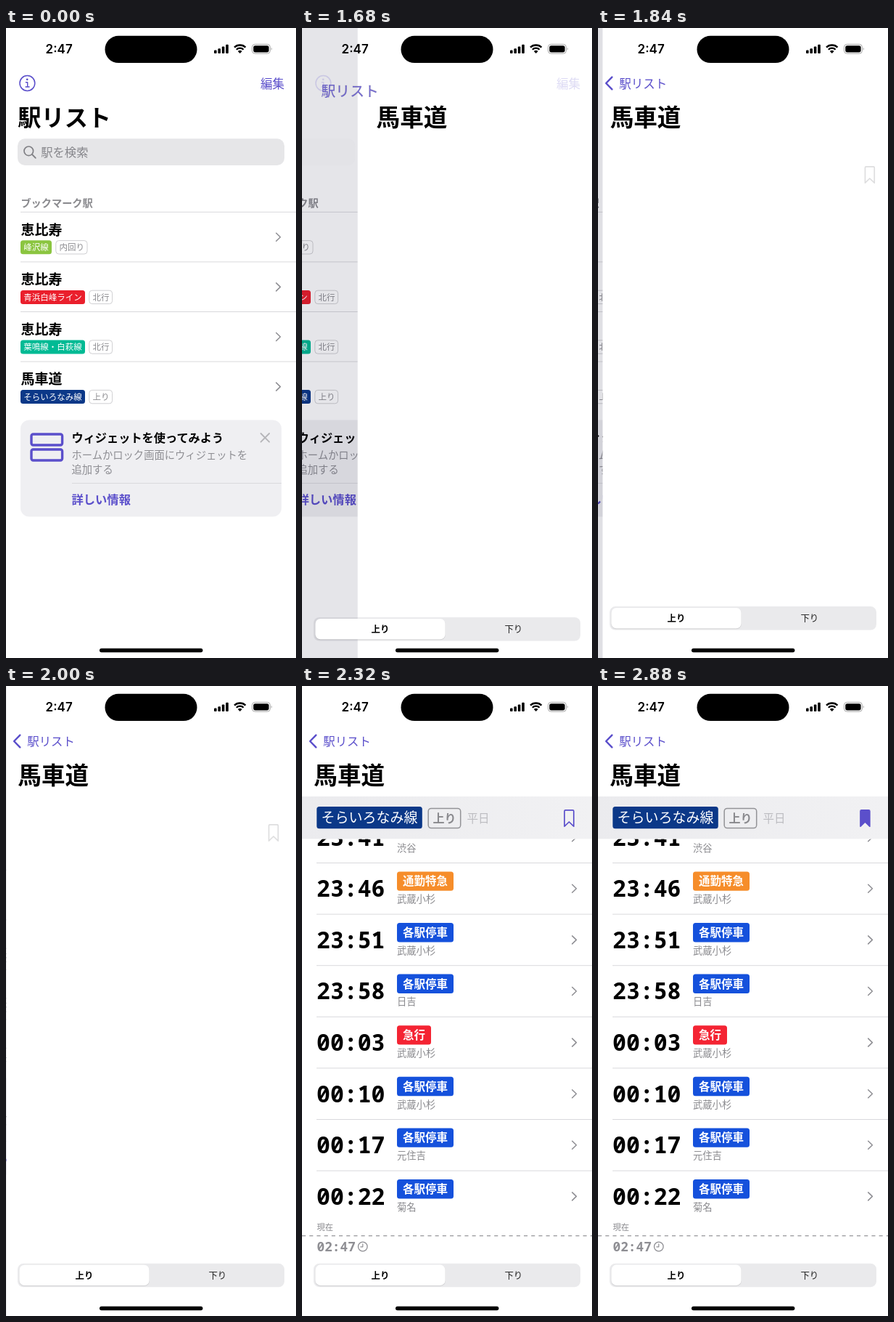
Recreate the animation shown at these times as an HTML page. Size 400 px wide and 867 px high, loop 2960 ms.

```html
<!DOCTYPE html>
<html lang="ja">
<head>
<meta charset="utf-8">
<title>駅リスト</title>
<style>
html, body { margin: 0; width: 100%; height: 100%; overflow: hidden; background: #fff; }
svg { display: block; width: 100vw; height: 100vh; }
text { font-family: "Noto Sans CJK JP", "Noto Sans CJK", "Noto Sans", sans-serif; white-space: pre; }
.mono { font-family: "Noto Sans Mono", monospace; }
.ui { font-family: Inter, sans-serif; }
</style>
</head>
<body>
<svg id="stage" viewBox="0 0 400 867" xmlns="http://www.w3.org/2000/svg"></svg>
<script>
const LOOP = 2960, STEP = 80, LOADED = 2320;
const PURPLE = '#5b4fcb', GRAY = '#8a8a8e', LINE = '#d9d9dc', NAVY = '#0b3888';

// --- drawing helpers -------------------------------------------------
const rect = (x, y, w, h, r, fill, extra = '') =>
  `<rect x="${x}" y="${y}" width="${w}" height="${h}" rx="${r}" fill="${fill}" ${extra}/>`;
const box = (x, y, w, h, r, color, sw = 1) =>
  rect(x, y, w, h, r, 'none', `stroke="${color}" stroke-width="${sw}"`);
const path = (d, color, sw, extra = '') =>
  `<path d="${d}" fill="none" stroke="${color}" stroke-width="${sw}" stroke-linecap="round" stroke-linejoin="round" ${extra}/>`;
const rule = (x, y, end = 400) => rect(x, y - 0.5, end - x, 1, 0, LINE);
// y is the vertical middle of the glyphs
const text = (x, y, size, fill, str, bold = 400, extra = '') =>
  `<text x="${x}" y="${y + size * 0.38}" font-size="${size}" fill="${fill}" font-weight="${bold}" ${extra}>${str}</text>`;
const arrow = y => path(`M372.7 ${y - 5.5}l5.7 5.5l-5.7 5.5`, '#8e8e93', 1.5);
const group = (id, body, extra = '') => `<g id="${id}" ${extra}>${body}</g>`;

// --- station list ----------------------------------------------------
const stations = [
  ['恵比寿', '峰沢線', 43, '#8bc540', '内回り'],
  ['恵比寿', '青浜白峰ライン', 89, '#ea1f2c', '北行'],
  ['恵比寿', '葉鳴線・白萩線', 89, '#00ba94', '北行'],
  ['馬車道', 'そらいろなみ線', 89, NAVY, '上り']
];

function stationRow([name, line, w, color, dir], i) {
  const y = 253.3 + i * 68.6, x = 20 + w + 5.8, dw = dir.length * 11.4 + 9;
  return rule(20, y) +
    text(20.4, y + 24, 19, '#000', name, 700) +
    rect(20, y + 39, w, 19, 3.5, color) +
    text(24.3, y + 48.4, 11.5, '#fff', line) +
    box(x, y + 39.3, dw, 18.4, 4, '#cfcfd2') +
    text(x + 4.6, y + 48.4, 11.5, GRAY, dir) +
    arrow(y + 34.5);
}

const card = rect(20, 539.5, 360, 133, 12, '#efeff2') +
  box(35, 559, 42.6, 15, 2.5, PURPLE, 3.4) + box(35, 580, 42.6, 15, 2.5, PURPLE, 3.4) +
  text(90.5, 564, 16.2, '#000', 'ウィジェットを使ってみよう', 700) +
  text(90.5, 587.3, 14.3, '#8e8e93', 'ホームかロック画面にウィジェットを') +
  text(90.5, 607.7, 14.3, '#8e8e93', '追加する') +
  path('M351.5 558l11.6 11.6m0 -11.6l-11.6 11.6', '#b4b4b8', 1.8) +
  rule(91, 626.5, 380) +
  text(90.5, 648.5, 16.3, PURPLE, '詳しい情報', 700);

const listPage = rect(-20, 0, 440, 867, 0, '#fff') +
  text(20.4, 240.3, 14.2, GRAY, 'ブックマーク駅', 700) +
  stations.map(stationRow).join('') + card;

const search = rect(16, 152.3, 368, 36.7, 10, '#767680', 'fill-opacity=".18"') +
  group('searchText',
    `<circle cx="31.3" cy="169.3" r="6.3" fill="none" stroke="#808085" stroke-width="1.7"/>` +
    path('M36 174l4.8 4.8', '#808085', 1.8) +
    text(48.3, 171, 16.3, '#86868b', '駅を検索'));

const info = `<circle cx="29.4" cy="76" r="10.4" fill="none" stroke="${PURPLE}" stroke-width="1.5"/>` +
  `<circle cx="29.2" cy="70.8" r="1.4" fill="${PURPLE}"/>` +
  path('M27.4 74.8h2.3v6.2m-2.6 0h5', PURPLE, 1.4);

// --- timetable -------------------------------------------------------
const BLUE = '#1551dc';
const trains = [
  ['23:41', '', BLUE, '渋谷'],
  ['23:46', '通勤特急', '#f68d2a', '武蔵小杉'],
  ['23:51', '各駅停車', BLUE, '武蔵小杉'],
  ['23:58', '各駅停車', BLUE, '日吉'],
  ['00:03', '急行', '#f42433', '武蔵小杉'],
  ['00:10', '各駅停車', BLUE, '武蔵小杉'],
  ['00:17', '各駅停車', BLUE, '元住吉'],
  ['00:22', '各駅停車', BLUE, '菊名']
];

function trainRow([time, kind, color, dest], i) {
  const y = 208.2 + i * 70.6;
  return (i ? rule(20, y - 35.3) : '') +
    text(20, y - 0.6, 31.5, '#000', time, 700, 'class="mono"') +
    (kind ? rect(131, y - 23.4, kind.length * 15.5 + 16, 26.4, 3.5, color) +
      text(139, y - 10.3, 15.5, '#fff', kind, 700) : '') +
    text(131, y + 14.3, 13.3, GRAY, dest) + arrow(y);
}

const nowMark = text(20.5, 745, 11.3, GRAY, '現在') +
  `<path d="M0 756.6H400" stroke="#97979b" stroke-width="1.1" stroke-dasharray="5.1 5.1"/>` +
  text(20.5, 771.6, 17.8, '#8e8e93', '02:47', 600, 'class="mono"') +
  `<circle cx="83.8" cy="771.5" r="6.3" fill="none" stroke="#8e8e93" stroke-width="1.3"/>` +
  path('M83.8 767.8v4h-3', '#8e8e93', 1.2);

const header = rect(0, 152, 400, 58.4, 0, 'url(#haze)') +
  rect(20.3, 166, 145.5, 30.2, 3.5, NAVY) +
  text(26.4, 181, 19, '#fff', 'そらいろなみ線') +
  box(174.2, 168.4, 44.5, 27.2, 4, '#939397', 1.5) +
  text(180.4, 182, 16, GRAY, '上り', 700) +
  text(227.6, 182.2, 15.5, '#bcbcc0', '平日');

const flag = 'M-6.4 -10q0 -1.3 1.3 -1.3h10.2q1.3 0 1.3 1.3v21l-6.4 -6.2l-6.4 6.2z';

const segments = rect(16, 794.7, 368, 32.5, 8, '#767680', 'fill-opacity=".15"') +
  rect(18.2, 797.3, 179.6, 28.6, 7, '#000', 'opacity=".1"') +
  rect(18.4, 796.6, 179.2, 28.3, 7, '#fff') +
  text(108, 810.8, 12.4, '#000', '上り', 700, 'text-anchor="middle"') +
  text(291.8, 810.8, 12.4, '#222', '下り', 400, 'text-anchor="middle"');

// --- status bar ------------------------------------------------------
const status = rect(136.5, 10.8, 127, 37.3, 18.6, '#000') +
  `<text class="ui" x="54.6" y="35.2" font-size="17" font-weight="600">2:47</text>` +
  [4.5, 6.8, 9.5, 12.3].map((h, i) => rect(287 + i * 5.4, 35 - h, 3.6, h, 1, '#000')).join('') +
  `<path d="M322.7 35l-2.9 -2.9a4.2 4.2 0 0 1 5.8 0z"/>` +
  path('M317.8 29.7a7 7 0 0 1 9.8 0', '#000', 2.3, 'style="stroke-linecap:butt"') +
  path('M315 26.6a11 11 0 0 1 15.4 0', '#000', 2.4, 'style="stroke-linecap:butt"') +
  box(339.4, 22.4, 25, 12.8, 4, '#a6a6a6') +
  rect(341.2, 24.2, 21.4, 9.2, 2.6, '#000') +
  `<path d="M365.8 26.8q2 2 0 4z" fill="#a6a6a6"/>`;

const title = (id, color, weight) =>
  text(0, 0, 32.2, color, '駅リスト', weight, `id="${id}"`);

const stage = document.getElementById('stage');
stage.innerHTML =
  `<clipPath id="below"><rect y="210.4" width="400" height="600"/></clipPath>` +
  `<linearGradient id="haze"><stop stop-color="#ebebee"/><stop offset="1" stop-color="#f1f1f3"/></linearGradient>` +
  group('list', listPage) +
  rect(0, 0, 400, 867, 0, '#101030', 'id="dim"') +
  rect(0, 0, 400, 867, 0, '#fff', 'id="sheet"') +
  group('search', search) +
  group('table', group('rows', trains.map(trainRow).join('') + nowMark, 'clip-path="url(#below)"') + header) +
  group('mark', `<path id="markShape" d="${flag}" stroke-linejoin="round" stroke-width="1.7"/>`) +
  group('info', info) +
  text(351, 76.3, 16.5, PURPLE, '編集', 400, 'id="edit"') +
  group('back', path('M19.3 67.6l-8.2 8.4l8.2 8.4', PURPLE, 2.5)) +
  group('label', title('labelDark', '#000', 700) + title('labelTint', PURPLE, 400)) +
  group('name', text(16.3, 122.6, 32.6, '#000', '馬車道', 700)) +
  group('tabs', segments) +
  status +
  rect(129, 853.8, 142.4, 5.4, 2.7, '#000');

const el = {};
stage.querySelectorAll('[id]').forEach(n => el[n.id] = n);

// --- motion ----------------------------------------------------------
const clamp = v => Math.max(0, Math.min(1, v));
const ramp = (v, a, b) => clamp((v - a) / (b - a));
const set = (id, attrs) => {
  for (const k in attrs) el[id].setAttribute(k, attrs[k]);
};
const move = (x, y = 0) => `translate(${x} ${y})`;

// critically damped push: 1 = list in place, 0 = timetable in place
function push(t) {
  if (t < 1600) return 1;
  if (t >= LOADED) return 0;
  const w = 1.53 + 0.019 * (t - 1600);
  return Math.max(0.0014, (1 + w) * Math.exp(-w));
}

// shrinks under the finger, then springs back
function markScale(t) {
  if (t < 2480) return 1 - 0.23 * ramp(t, 2400, 2480);
  const u = t - 2480;
  return 1 - 0.23 * Math.exp(-u / 60) * Math.cos(u / 70);
}

function draw(t) {
  const p = push(t), d = 1 - p, loaded = t >= LOADED;

  set('list', { transform: move(-120 * d) });
  set('dim', { opacity: 0.13 * d });
  set('sheet', { x: 400 * p });

  set('search', { transform: move(-Math.max(0, 440 * d - 45)), opacity: ramp(p, 0.1, 1) });
  set('searchText', { opacity: 1 - ramp(d, 0, 0.3) });
  set('info', { opacity: clamp(p * 1.15 - 0.03) });
  set('edit', { opacity: clamp(p * 1.15 - 0.02) });
  set('back', { opacity: ramp(d, 0.82, 0.97) });

  const k = clamp(Math.pow(d, 1.2) * (1 + 0.015 * d));
  set('label', { transform: `${move(16.3 + 13 * k, 122.8 - 46.8 * k)} scale(${1 - 0.49 * k})` });
  set('labelDark', { opacity: 1 - ramp(d, 0.2, 0.9) });
  set('labelTint', { opacity: ramp(d, 0.1, 0.95) });

  set('name', {
    transform: move(450 * p * ramp(p, 0.01, 0.12)),
    opacity: ramp(d, 0, 0.57)
  });
  set('tabs', { transform: move(0, 85 * p), visibility: d ? 'visible' : 'hidden' });
  set('table', { visibility: loaded ? 'visible' : 'hidden' });

  set('mark', {
    transform: `${move(368.4 + 400 * p, loaded ? 182.2 : 202.2)} scale(${markScale(t)})`
  });
  set('markShape', {
    fill: PURPLE, 'fill-opacity': ramp(t, 2480, 2640),
    stroke: loaded ? PURPLE : '#dededf'
  });
}

function frame(now) {
  draw(Math.floor(now % LOOP / STEP) * STEP);
  requestAnimationFrame(frame);
}
draw(0);
requestAnimationFrame(frame);
</script>
</body>
</html>
```
